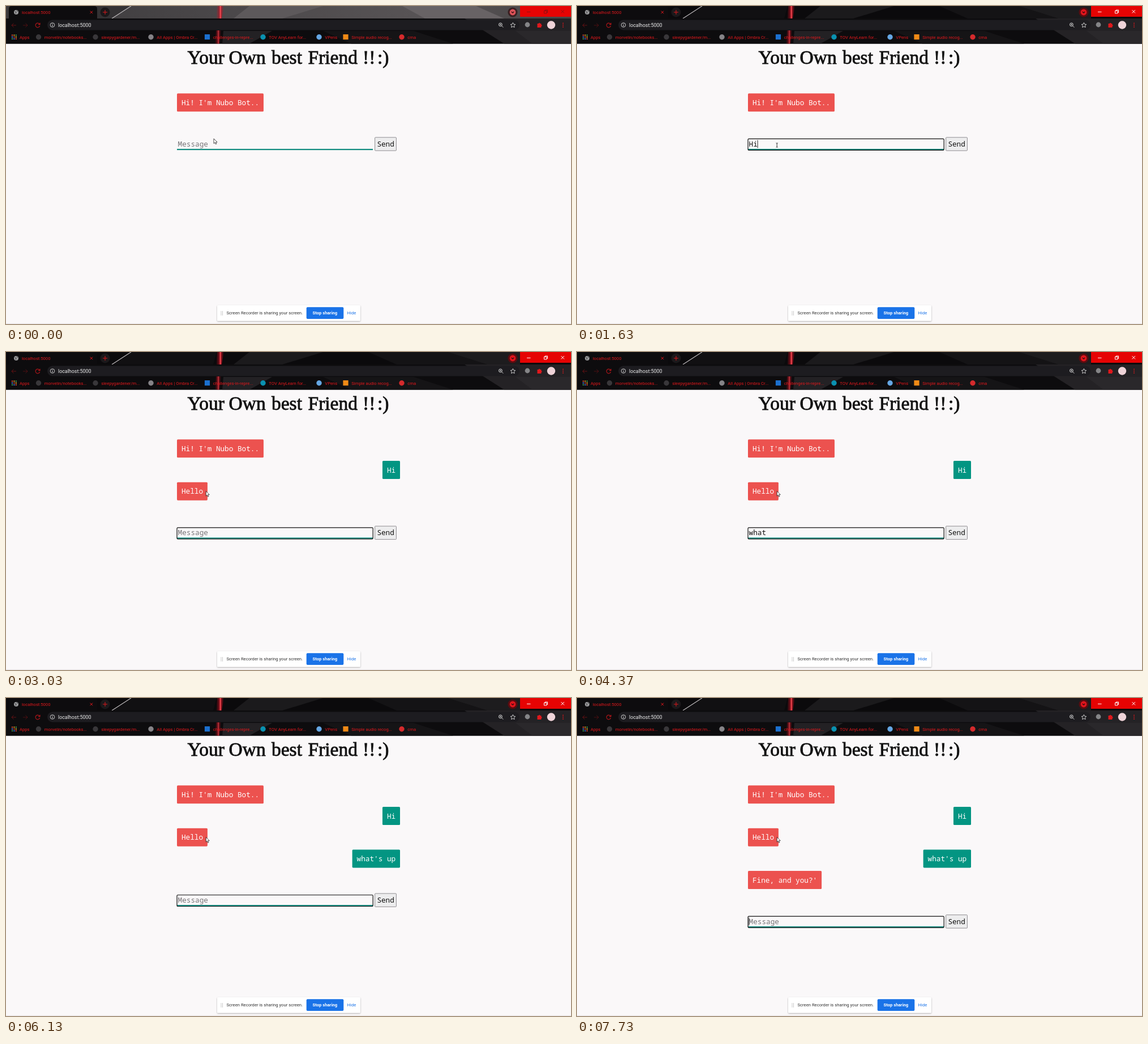
An HTML page that plays this animation: 998 by 561 pixels, repeating every 8 s.

```html
<!DOCTYPE html>
<html lang="en">
<head>
<meta charset="utf-8">
<title>Chat bot</title>
<style>
  html, body { margin: 0; width: 100%; height: 100%; overflow: hidden; background: #faf8f9; }
  svg { display: block; width: 100%; height: 100%; }
  text { white-space: pre; }
  .ui { font: 7.68px Roboto, "Open Sans", sans-serif; }
  .mono { font: 12.7px "Noto Sans Mono", "DejaVu Sans Mono", monospace; }
  .title { font: 33.5px "Liberation Serif", "Noto Serif", serif; fill: #111; stroke: #111; stroke-width: .85; }
  .red { fill: #e0181c; }
  .line { fill: none; stroke: #e0181c; stroke-width: 1; }
</style>
</head>
<body>
<svg viewBox="0 0 998 561" preserveAspectRatio="none">
  <defs>
    <linearGradient id="neon">
      <stop offset="0" stop-color="#c01020" stop-opacity="0"/>
      <stop offset=".4" stop-color="#c01020" stop-opacity=".6"/>
      <stop offset=".55" stop-color="#ff5058"/>
      <stop offset=".7" stop-color="#c01020" stop-opacity=".6"/>
      <stop offset="1" stop-color="#c01020" stop-opacity="0"/>
    </linearGradient>
    <linearGradient id="strip">
      <stop offset="0" stop-color="#3b393b"/>
      <stop offset=".4" stop-color="#4b484a"/>
      <stop offset=".75" stop-color="#585456"/>
      <stop offset="1" stop-color="#484546"/>
    </linearGradient>
    <filter id="soft" x="-10%" y="-40%" width="120%" height="200%">
      <feDropShadow dx="0" dy="1" stdDeviation="1.3" flood-opacity=".35"/>
    </filter>
  </defs>
  <rect width="998" height="561" fill="#faf8f9"/>
  <rect y="560" width="998" height="1" fill="#e7e4e7"/>

  <!-- browser window -->
  <rect width="998" height="66.5" fill="#0d0c0e"/>
  <g id="active">
    <rect width="998" height="22" fill="#0b0a0c"/>
    <path d="M222 0H372L366 22H187Z" fill="#111012"/>
    <path d="M430 0H560L488 22H402Z" fill="#1b1a1c"/>
    <path d="M640 0H780L850 22H690Z" fill="#141315"/>
    <path d="M780 0H908V22H850Z" fill="#1d1c1e"/>
  </g>
  <g id="idle">
    <rect width="998" height="22" fill="url(#strip)"/>
    <path d="M160 0H222L187 22H160Z" fill="#343234"/>
    <path d="M430 0H560L488 22H402Z" fill="#5d595b"/>
    <path d="M700 0H830L880 22H740Z" fill="#686365"/>
  </g>
  <path d="M221 0L187 22" stroke="#bdb9bb" stroke-width="1.2"/>
  <path d="M0 22H998V66.5H0Z" fill="#0d0c0e"/>
  <path d="M384 44H470L430 66.5H382Z" fill="#232124"/>
  <path d="M560 44H720L790 66.5H610Z" fill="#151416"/>
  <path d="M810 22H998V66.5H880Z" fill="#242225"/>
  <path d="M900 44H998V66.5H930Z" fill="#2a282b"/>
  <path d="M373 0H385L381 22H371Z" fill="url(#neon)"/>
  <path d="M371 43H380L377 66.5H369Z" fill="url(#neon)" opacity=".8"/>
  <path d="M5 22V5Q5 0 10 0H156Q161 0 161 5V22Z" fill="#0d0c0e"/>
  <rect x="73" y="24.5" width="834" height="18" rx="9" fill="#1d1c20"/>

  <circle cx="18" cy="11" r="4" fill="#9a9a9c"/>
  <path d="M15.5 9.5L18 11L17 13.5M19 7.5L20.5 10" stroke="#333" fill="none"/>
  <text class="ui red" x="28" y="13.5">localhost:5000</text>
  <path class="line" d="M148.5 8.7l4.6 4.6m0-4.6l-4.6 4.6"/>
  <circle cx="175" cy="11" r="8.5" fill="#1b191b"/>
  <path class="line" stroke-width="1.3" d="M171 11h8m-4-4v8"/>
  <circle id="dot" cx="895" cy="11" r="8.6"/>
  <circle id="dotCore" cx="895" cy="11" r="5.4"/>
  <path d="M892.8 10l2.2 2.2l2.2-2.2" fill="none" stroke="#2a0a0c" stroke-width="1.1"/>
  <rect x="908" width="90" height="19" fill="#e60303"/>
  <path id="winIcons" fill="none" d="M920 10.5h6.5M950.5 8.5h4.5v4.5h-4.5zM952 8.3v-1.3h4.5v4.5h-1.3M980.5 7l5.5 5.5m0-5.5l-5.5 5.5"/>

  <g class="line" opacity=".75">
    <path d="M18 34H10m3.5-3.5L10 34l3.5 3.5" opacity=".55"/>
    <path d="M30 34H38m-3.5-3.5L38 34l-3.5 3.5" opacity=".4"/>
    <path d="M59.2 32A3.8 3.8 0 1 0 59.6 35M60 29.8V32.6H57" stroke-width="1.2"/>
  </g>
  <circle cx="82" cy="33.5" r="3.8" fill="none" stroke="#ddd" stroke-width=".9"/>
  <path d="M82 33v2.8M82 31.2v1" stroke="#ddd"/>
  <text class="ui" style="font-size:8.9px" x="92" y="36.8" fill="#eee">localhost:5000</text>
  <circle cx="873.4" cy="32.8" r="2.9" fill="none" stroke="#ddd"/>
  <path d="M875.6 35l2.8 2.8M872 32.8h2.8m-1.4-1.4v2.8" stroke="#ddd" stroke-width=".9"/>
  <path d="M895.4 29.3l1.3 2.8 3 .4-2.2 2.1.6 3.1-2.7-1.5-2.7 1.5.6-3.1-2.2-2.1 3-.4z" fill="none" stroke="#ddd" stroke-width=".9"/>
  <circle cx="921" cy="33" r="4.4" fill="#858587"/>
  <path d="M938.5 31h2.3a1.3 1.3 0 0 1 2.6 0h2v2.2a1.3 1.3 0 0 1 0 2.6v2.2h-6.9z" class="red"/>
  <circle cx="963" cy="33.5" r="7.2" fill="#efd3d8"/>
  <g class="red"><circle cx="984" cy="30.5" r=".9"/><circle cx="984" cy="33.7" r=".9"/><circle cx="984" cy="36.9" r=".9"/></g>
  <g id="bookmarks"></g>

  <!-- page -->
  <text class="title" y="102"><tspan x="320.5">Your</tspan><tspan x="393.5">Own</tspan><tspan x="469">best</tspan><tspan x="533.5">Friend</tspan><tspan x="630">!!</tspan><tspan x="656">:)</tspan></text>
  <g id="bubbles"></g>
  <g id="form">
    <rect x="302" y="252" width="346" height="2.2" fill="#128c80"/>
    <rect id="ring" x="302" y="234.4" width="346.2" height="20" rx="1.6" fill="none" stroke="#111" stroke-width="1.2"/>
    <text id="field" class="mono" x="303.6" y="248"></text>
    <rect id="caret" y="236.5" width=".9" height="14" fill="#111"/>
    <rect x="651.6" y="231.8" width="37.8" height="23.4" rx="1" fill="#ededee" stroke="#858387" stroke-width=".9"/>
    <text class="mono" x="655.4" y="248" fill="#111">Send</text>
  </g>

  <!-- sharing bar -->
  <rect x="373" y="528" width="253" height="27.5" rx="1.5" fill="#fff" filter="url(#soft)"/>
  <path d="M380 538.5v7M382.5 538.5v7" stroke="#999" stroke-dasharray="1 1"/>
  <text class="ui" x="389.5" y="544.4" fill="#333">Screen Recorder is sharing your screen.</text>
  <rect x="530.7" y="531.3" width="65.6" height="20.6" rx="2" fill="#1a73e8"/>
  <text class="ui" x="563.3" y="544.4" fill="#fff" text-anchor="middle" style="font-weight:600">Stop sharing</text>
  <text class="ui" x="602.6" y="544.4" fill="#1a73e8">Hide</text>

  <path id="arrow" d="M0 0V8.6L2 6.8L3.4 9.8L4.8 9.2L3.5 6.2H6.1Z" fill="#fff" stroke="#222" stroke-width=".8"/>
  <path id="beam" d="M-1.6-3.8Q0-3.8 0-2.8Q0-3.8 1.6-3.8M0-3V3M-1.6 3.8Q0 3.8 0 2.8Q0 3.8 1.6 3.8" fill="none" stroke="#222" stroke-width=".9"/>
</svg>
<script>
const LOOP = 8000, BLINK = 530, CHAR = 7.62, PITCH = 37.7;
const FOCUS = 400, POINTER_BACK = 2100;
const NS = "http://www.w3.org/2000/svg";
const ui = Object.fromEntries(
  [...document.querySelectorAll("[id]")].map(n => [n.id, n]));

function add(parent, tag, attrs, text = "") {
  const node = document.createElementNS(NS, tag);
  for (const k in attrs) node.setAttribute(k, attrs[k]);
  node.textContent = text;
  return parent.appendChild(node);
}
const set = (node, key, value) => node.setAttribute(key, value);
const show = (node, on) => set(node, "visibility", on ? "visible" : "hidden");

// label, icon centre, icon colour, square icon
const links = [
  ["morvelin/notebooks...", 57.5, "#39373a"],
  ["sleepygardener/m...", 158, "#39373a"],
  ["All Apps | Ombra Cr...", 256, "#858387"],
  ["challenges-in-repre...", 355.5, "#1b70cf", true],
  ["TOV AnyLearn for...", 454, "#0a91b0"],
  ["VPens", 553, "#65a7e4"],
  ["Simple audio recog...", 600, "#f08a16", true],
  ["cma", 699, "#d52a2c"]
];
const dotColors = ["#e84a3c", "#f2b01e", "#3ca55c", "#3f83ea"];
for (let i = 0; i < 9; i++) {
  add(ui.bookmarks, "rect", {
    x: 10 + i % 3 * 3.4, y: 50.5 + Math.floor(i / 3) * 3.2,
    width: 2, height: 2, fill: dotColors[i % 4]
  });
}
add(ui.bookmarks, "text", { class: "ui red", x: 24, y: 57.5 }, "Apps");
for (const [label, x, fill, square] of links) {
  if (square) add(ui.bookmarks, "rect", { x: x - 4.6, y: 50, width: 9.2, height: 9.2, fill });
  else add(ui.bookmarks, "circle", { cx: x, cy: 54.7, r: 4.7, fill });
  add(ui.bookmarks, "text", { class: "ui red", x: x + 10.3, y: 57.5 }, label);
}

const messages = [
  { at: 0, text: "Hi! I'm Nubo Bot.." },
  { at: 2100, text: "Hi", mine: true },
  { at: 2960, text: "Hello" },
  { at: 6090, text: "what's up", mine: true },
  { at: 7200, text: "Fine, and you?'" }
];
messages.forEach((m, i) => {
  const width = m.text.length * CHAR + 15.8;
  const x = m.mine ? 696 - width : 302;
  const y = 154.3 + i * PITCH;
  m.node = add(ui.bubbles, "g", {});
  add(m.node, "rect", { x, y, width, height: 32, rx: 1.6, fill: m.mine ? "#039582" : "#ec524f" });
  add(m.node, "text", { class: "mono", x: x + 8, y: y + 20.7, fill: "#fff" }, m.text);
});

// each entry: the text to type and the moment of every key
const drafts = [
  { text: "Hi", keys: [1130, 1300], sent: 2100 },
  { text: "what's up", keys: [3250, 3360, 3450, 3540, 4600, 4850, 5050, 5300, 5470], sent: 6090 }
];

function drawForm(t) {
  let typed = "", lastKey = FOCUS;
  for (const d of drafts) {
    const past = d.keys.filter(k => k <= t);
    if (past.length) lastKey = past[past.length - 1];
    if (t < d.sent) typed += d.text.slice(0, past.length);
  }
  const focused = t >= FOCUS;
  const sent = messages.filter(m => t >= m.at).length - 1;
  set(ui.form, "transform", `translate(0 ${sent * PITCH})`);
  ui.field.textContent = typed || "Message";
  set(ui.field, "fill", typed ? "#111" : "#777578");
  set(ui.caret, "x", 303.4 + typed.length * CHAR);
  show(ui.ring, focused);
  show(ui.caret, focused && Math.floor((t - lastKey) / BLINK) % 2 === 0);
}

function drawPointer(t) {
  const p = Math.min(1, Math.max(0, (t - 30) / (FOCUS - 60)));
  const ease = p * p * (3 - 2 * p);
  const x = 367 - 13.8 * ease, y = 234 + 11.5 * ease;
  const overField = y > 235.5 && t < POINTER_BACK;
  for (const node of [ui.arrow, ui.beam]) set(node, "transform", `translate(${x} ${y})`);
  show(ui.arrow, !overField);
  show(ui.beam, overField);
}

function draw(t) {
  const active = t >= FOCUS;
  show(ui.active, active);
  show(ui.idle, !active);
  set(ui.dot, "fill", active ? "#5b0c10" : "#3a2022");
  set(ui.dotCore, "fill", active ? "#e0141c" : "#dc5258");
  set(ui.winIcons, "stroke", active ? "#fff" : "#8e1010");
  for (const m of messages) show(m.node, t >= m.at);
  drawForm(t);
  drawPointer(t);
}

const start = performance.now();
function tick() {
  draw((performance.now() - start) % LOOP);
  requestAnimationFrame(tick);
}
tick();
</script>
</body>
</html>
```
